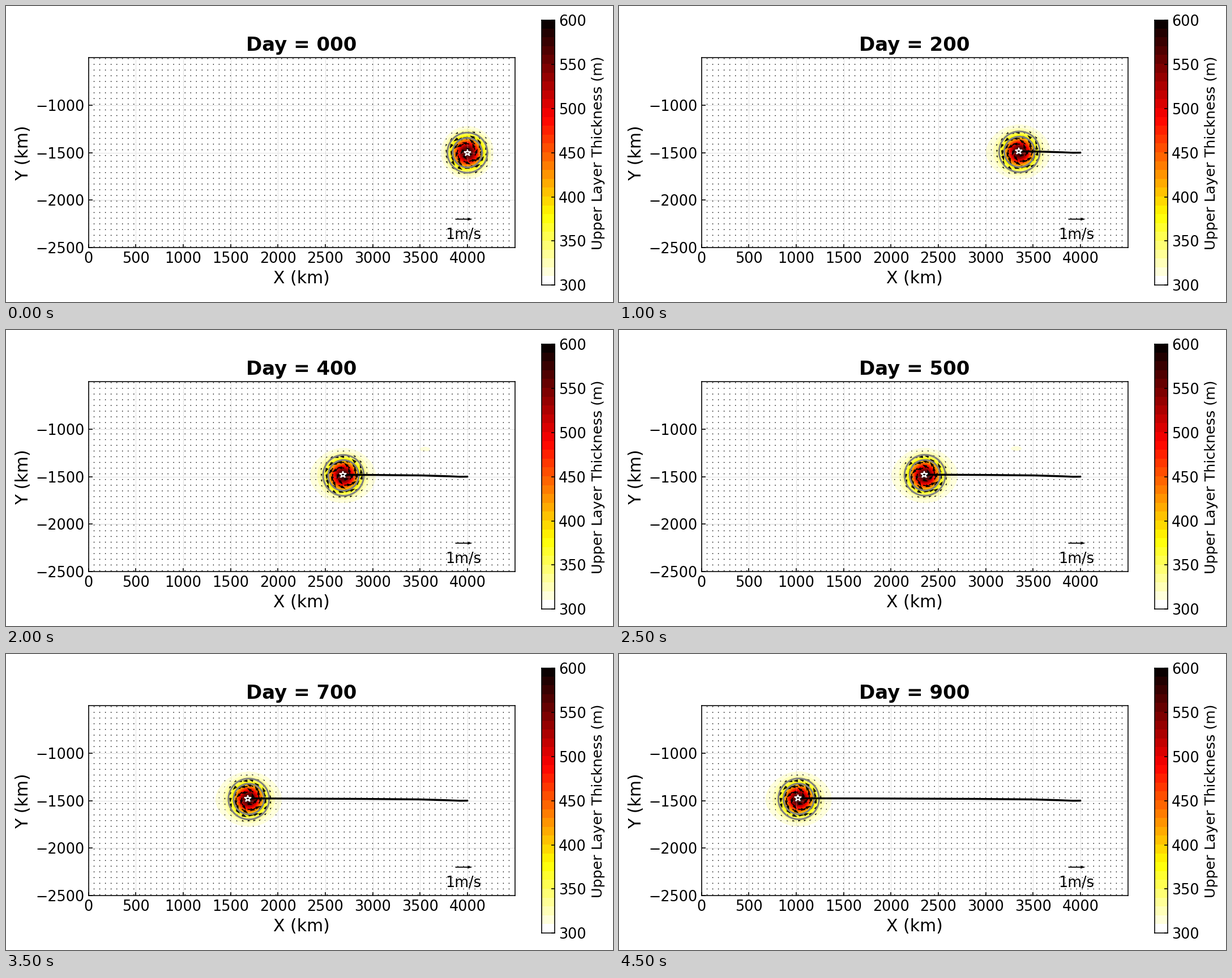
Animation, 1072 px wide and 522 px high, one loop 5000 ms. Source, as a matplotlib script:

```python
import numpy as np
import matplotlib.pyplot as plt
from matplotlib.animation import FuncAnimation

W, H, DPI = 1072, 522, 64
FRAMES, INTERVAL, DAY_STEP = 10, 500, 100
LEVELS = np.arange(300, 601, 10)
CMAP = plt.get_cmap("hot_r", len(LEVELS) - 1)

plt.rcParams["font.family"] = "DejaVu Sans"


def px(n):
    """Pixels to points."""
    return n * 72 / DPI


def box(left, top, right, bottom):
    return [left / W, 1 - bottom / H, (right - left) / W, (bottom - top) / H]


fig = plt.figure(figsize=(W / DPI, H / DPI), dpi=DPI, facecolor="white")
ax = fig.add_axes(box(145.5, 91.2, 898.5, 426.1))
bar = fig.add_axes(box(946, 25, 969, 492.3))


def label(x, y, text, size, **style):
    return fig.text(x / W, 1 - y / H, text, fontsize=px(size), ha="center",
                    va="baseline", rotation_mode="anchor", **style)


def style_axes(axes, pad):
    axes.tick_params(direction="in", length=px(6.5), width=px(1.6),
                     pad=px(pad), labelsize=px(25.5))
    for spine in axes.spines.values():
        spine.set_linewidth(px(1.6))


# Colour bar
bar.imshow(np.arange(len(LEVELS) - 1)[:, None], cmap=CMAP, origin="lower",
           aspect="auto", extent=(0, 1, 300, 600), interpolation="nearest")
bar.set_xticks([])
bar.yaxis.tick_right()
bar.set_yticks(range(300, 601, 50))
style_axes(bar, 6.8)

# Map
ax.set_xlim(0, 4500)
ax.set_ylim(-2500, -500)
ax.set_xticks(range(0, 4001, 500))
ax.set_yticks(range(-2500, -999, 500))
ax.grid(color="#b0b0b0", linestyle=":", linewidth=px(1))
style_axes(ax, 7)

title = label(522, 79, "Day = 000", 34, weight="bold")
label(522.3, 489, "X (km)", 29.9)
label(39, 259, "Y (km)", 29.9, rotation=90)
label(1053, 259.5, "Upper Layer Thickness (m)", 25.4, rotation=90)
label(807.5, 411, "1m/s", 25.5)

ARROW = dict(units="width", width=0.0024, scale=25, scale_units="width", color="black")
gx, gy = np.meshgrid(np.arange(0, 4500, 60), np.arange(-2490, -509, 60))
hx, hy = np.meshgrid(np.arange(0, 4501, 10), np.arange(-2500, -499, 10))
arrows = ax.quiver(gx, gy, 0 * gx, 0 * gy, zorder=2.2, **ARROW)
ax.quiver([3873], [-2200], [1], [0], zorder=2.2, **ARROW)

rings = [ax.plot([], [], color="#808080", lw=px(3), zorder=2.5)[0] for _ in range(2)]
track, = ax.plot([], [], color="black", lw=px(3.4), zorder=3,
                 solid_capstyle="round")
star, = ax.plot([], [], "*", color="white", mfc="none", ms=px(12), mew=px(2), zorder=4)


def centre(day):
    x = 4000 - 3.33 * day + 16 * (1 - np.exp(-day / 60))
    y = np.interp(day, [0, 25, 60, 150, 300, 600, 900],
                  [-1500, -1501, -1496, -1487, -1482, -1477, -1475])
    return x, y


def bump(x, y, rx, ry):
    return np.exp(-(x / rx) ** 2 - (y / ry) ** 2)


def thickness(day, cx, cy, grown):
    size = 151 - 9 * grown
    h = 300 + (280 - 22 * grown) * bump(hx - cx, hy - cy, size, size)
    lag = 48 * np.exp(-day / 220)
    h += 25 * grown * bump(hx - cx + lag, hy - cy + 6, 349, 236)
    if 300 <= day <= 600:
        # small patch left behind in the wake
        wx, wy = 3553 - 2.3 * (day - 400), -1211 + 0.075 * (day - 400)
        h += 14 * bump(hx - wx, hy - wy, 93, 36)
    return np.clip(h, 300, 600)


def velocity(cx, cy):
    dx, dy = (gx - cx) / 154, (gy - cy) / 154
    speed = 0.46 / 0.429 * np.exp(-dx ** 2 - dy ** 2)
    return -dy * speed, dx * speed


fill = None


def update(i):
    global fill
    day = i * DAY_STEP
    grown = 1 - np.exp(-day / 80)
    sx, sy = centre(day)
    cx, cy = sx + 8 * grown, sy - 6 * grown

    if fill is not None:
        fill.remove()
    fill = ax.contourf(hx, hy, thickness(day, cx, cy, grown), LEVELS,
                       cmap=CMAP, zorder=1)
    arrows.set_UVC(*velocity(cx, cy))

    a = np.linspace(0, 2 * np.pi, 121)
    for ring, r in zip(rings, (155 + 6 * grown, 211 + 4 * grown)):
        ring.set_data(cx + r * np.cos(a), cy + r * np.sin(a))

    track.set_data(*centre(np.linspace(0, day, 20 * i + 1)))
    track.set_visible(i > 0)
    star.set_data([sx], [sy])
    title.set_text(f"Day = {day:03d}")
    return []


anim = FuncAnimation(fig, update, frames=FRAMES, interval=INTERVAL,
                     repeat=True, repeat_delay=0, blit=False)
plt.show()
```
